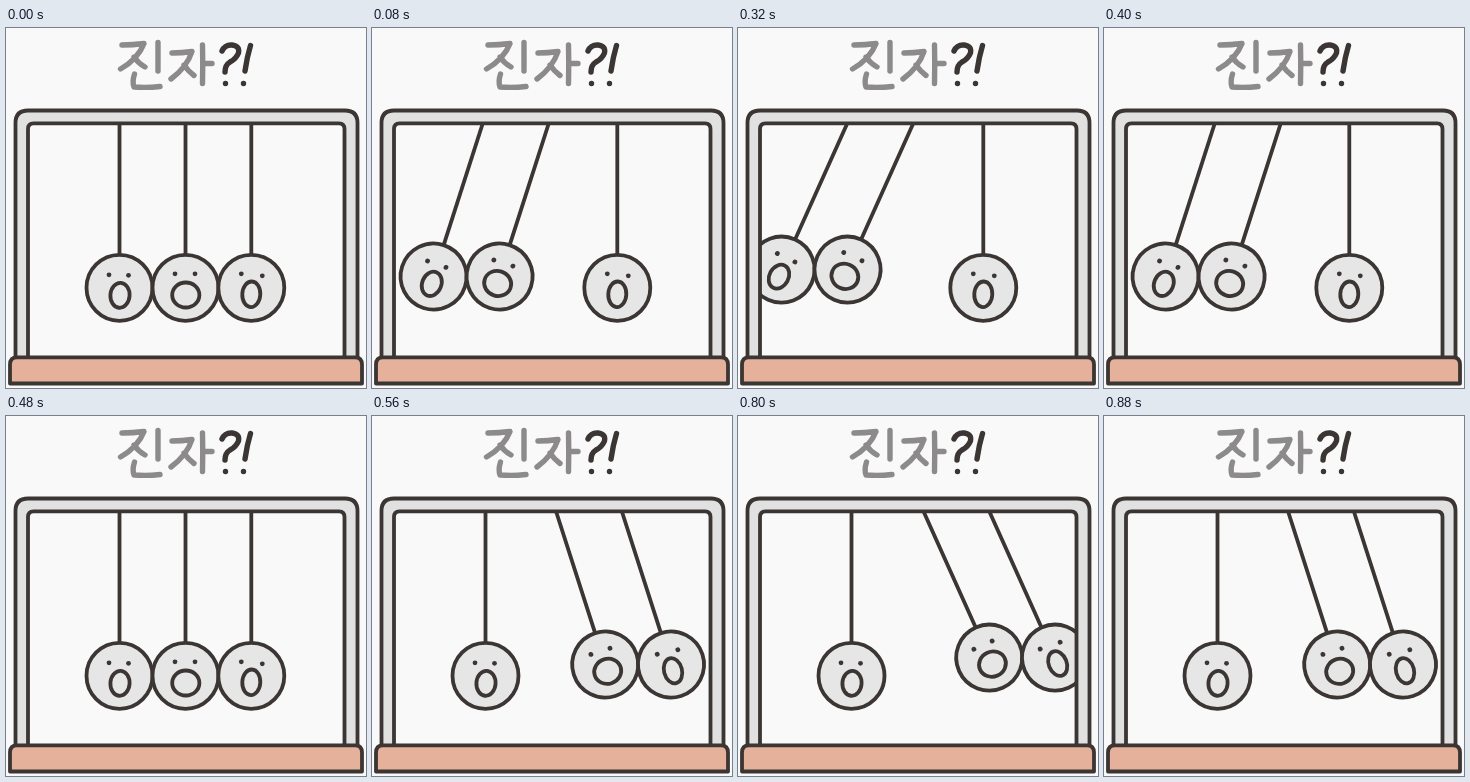
Animation, 360 px wide and 360 px high, one loop 960 ms. Source, as an HTML page:

```html
<!DOCTYPE html>
<html lang="ko">
<head>
<meta charset="utf-8">
<title>진자?!</title>
<style>
  html, body { margin: 0; width: 100%; height: 100%; overflow: hidden; background: #f9f9f9; }
  svg { display: block; width: 100vw; height: 100vh; }
  .ink { stroke: #3b3534; stroke-width: 3.8; stroke-linecap: round; stroke-linejoin: round; }
  .title { fill: none; stroke-width: 5.4; stroke-linecap: round; stroke-linejoin: round; }
</style>
</head>
<body>
<svg viewBox="0 0 360 360" role="img" aria-label="진자?!">
  <g class="title">
    <path stroke="#8c8a8a" d="M116 17Q127 17 138 15.500Q132 31 114.500 41M128 29Q132 35 139 39M152 14.500V43M128.500 46Q126 54 128 59Q141 60 154 58.500
      M166 25Q176 25 186 23.500Q181 39 165 51M178 37Q182 43 188 47.500M196.500 17Q197 36 196.500 55.500M198 35.500H206"/>
    <path stroke="#3b3534" d="M216 23Q219 16.500 226 17Q234 18 232.500 25Q230 31 224 34Q219 37 219 44M219.500 55.500v.1M244.500 17.500Q241 29 239 43M237.500 55.500v.1"/>
  </g>
  <g id="balls"></g>
  <path class="ink" fill="#e2e1e1" d="M9.500 332V95Q9.500 82.500 22 82.500H339Q351.500 82.500 351.500 95V332H338.500V101Q338.500 95.300 333 95.300H27.500Q22 95.300 22 101V332Z"/>
  <path class="ink" fill="#e5b19a" d="M4 355.500V336.500Q4 329.300 11 329.300H349Q356 329.300 356 336.500V355.500Z"/>
</svg>
<script>
const STEP = 80, PIVOT_Y = 87, BALL_Y = 259.8;
const QUARTER = [0, 17.8, 24.2, 27.2];          // decelerating swing, degrees
const balls = [
  { x: 113.5, eyes: [-10.5, -13, 9, -12.5], mouth: [0.5, 7.5, 9.6, 12.5, 4] },
  { x: 179.5, eyes: [-10.5, -14, 9.5, -14], mouth: [0.3, 7.2, 13.6, 12.5, 0] },
  { x: 245.3, eyes: [-10, -14, 11, -12], mouth: [0, 6.5, 9, 12.8, 3] }
];
const group = document.getElementById('balls');

group.innerHTML = balls.map(({ x, eyes: [ax, ay, bx, by], mouth: [mx, my, rx, ry, tilt] }) => `
  <g><path class="ink" d="M${x} ${PIVOT_Y}V${BALL_Y - 33}"/>
    <g transform="translate(${x} ${BALL_Y})">
      <circle class="ink" r="33" fill="#e7e6e6"/>
      <g fill="#3b3534"><circle cx="${ax}" cy="${ay}" r="2.4"/><circle cx="${bx}" cy="${by}" r="2.4"/></g>
      <ellipse class="ink" cx="${mx}" cy="${my}" rx="${rx}" ry="${ry}" fill="none" transform="rotate(${tilt} ${mx} ${my})"/>
    </g></g>`).join('');

function draw(now) {
  const step = Math.floor(now / STEP) % 12;
  const phase = step % 6;
  const angle = QUARTER[Math.min(phase, 6 - phase)];
  const left = step < 6;
  balls.forEach(({ x }, i) => {
    const swings = angle && (left ? i < 2 : i > 0);
    group.children[i].setAttribute('transform', swings
      ? `translate(0.9 -3) rotate(${left ? angle : -angle} ${x} ${PIVOT_Y})` : '');
  });
}

const start = performance.now();
function tick() {
  draw(performance.now() - start);
  requestAnimationFrame(tick);
}
tick();
</script>
</body>
</html>
```
